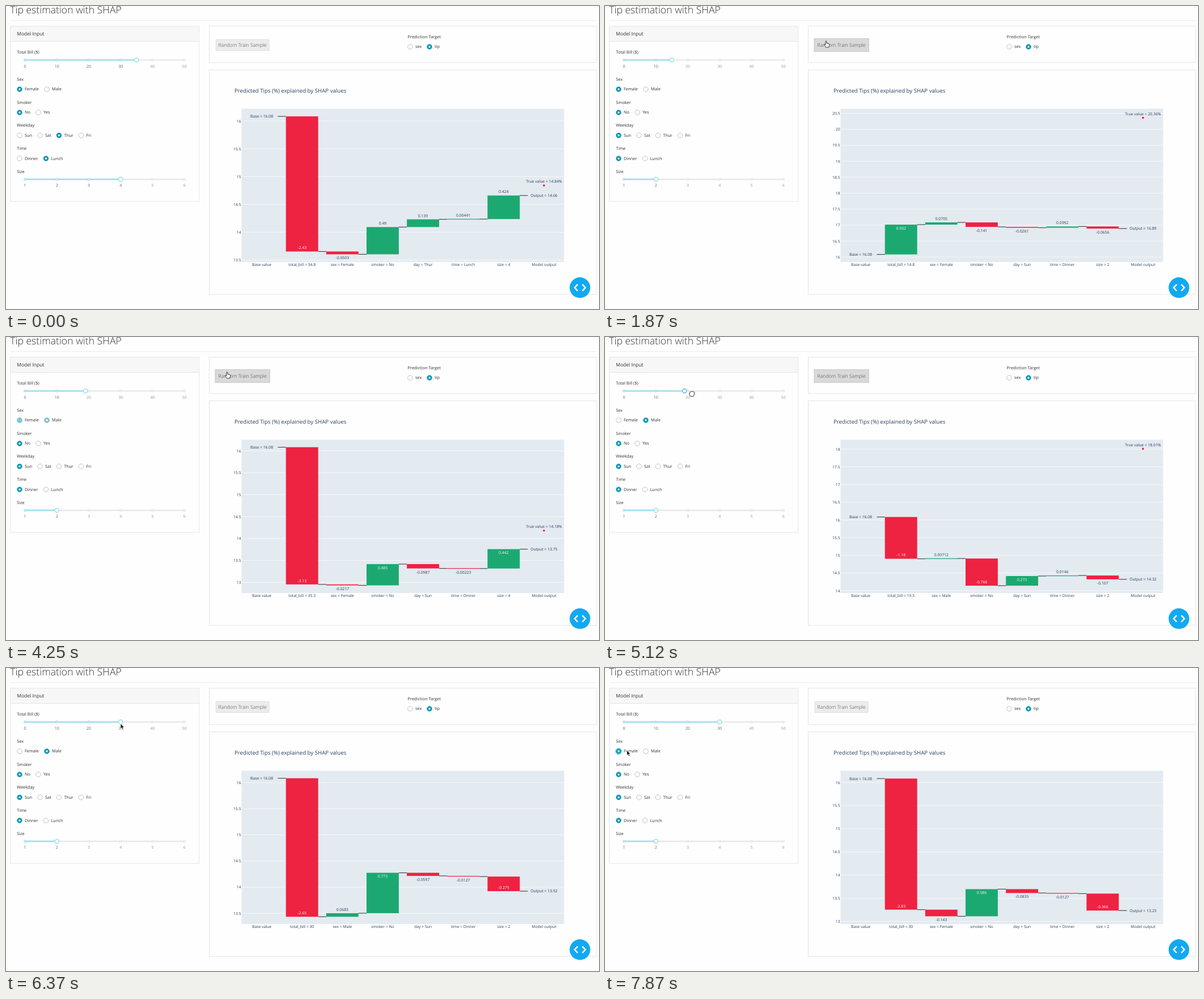
Write an HTML page that moves like this. It is 1046 px wide and 535 px high and loops after 8 s.

```html
<!DOCTYPE html>
<html lang="en">
<head>
<meta charset="utf-8">
<title>Tip estimation</title>
<style>
  html, body { margin: 0; width: 100%; height: 100%; overflow: hidden; background: #fefefe; }
  svg { display: block; }
  text { font-family: "Open Sans", "Noto Sans", sans-serif; text-rendering: geometricPrecision; white-space: pre; }
</style>
</head>
<body>
<svg id="stage" width="1046" height="535" viewBox="0 0 1046 535"></svg>
<script>
const LOOP = 8000, STEP = 125;
const RED = '#ee2241', GREEN = '#1ca971', INK = '#2a3f5f', TEAL = [11, 150, 180];
const stage = document.getElementById('stage');

// Input states: bill, sex, smoker, weekday, time, size
const inputs = [
  { at: -1000, bill: 35, picks: [0, 0, 2, 1], size: 4 },
  { at: 1500, bill: 15, picks: [0, 0, 0, 0], size: 2 },
  { at: 2625, bill: 35, picks: [0, 0, 0, 0], size: 4 },
  { at: 4125, bill: 19, picks: [1, 0, 0, 0], size: 2 },
  { at: 7500, bill: 30, picks: [0, 0, 0, 0], size: 2 }
];
const groups = [
  { name: 'Sex', y: 147, items: [['Female', 24], ['Male', 72]] },
  { name: 'Smoker', y: 188, items: [['No', 24], ['Yes', 57]] },
  { name: 'Weekday', y: 228.4, items: [['Sun', 24], ['Sat', 60], ['Thur', 93.5], ['Fri', 132.5]] },
  { name: 'Time', y: 269.2, items: [['Dinner', 24], ['Lunch', 70.5]] }
];

// y16 is the height of the value 16, unit the pixels per percent
const charts = [
  { at: 0, y16: 203, unit: 98.2, bill: 34.8, picks: [0, 0, 2, 1], size: 4, truth: '14.84', out: '14.66',
    steps: ['-2.43', '-0.0503', '0.49', '0.139', '0.00441', '0.424'], risesOutside: true },
  { at: 1750, y16: 443.3, unit: 56.4, bill: 14.8, picks: [0, 0, 0, 0], size: 2, truth: '20.36', out: '16.89',
    steps: ['0.932', '0.0705', '-0.141', '-0.0261', '0.0392', '-0.0656'] },
  { at: 2875, y16: 201, unit: 77.4, bill: 35.3, picks: [0, 0, 0, 0], size: 4, truth: '14.18', out: '13.75',
    steps: ['-3.13', '-0.0217', '0.485', '-0.0987', '-0.00223', '0.442'] },
  { at: 4625, y16: 323, unit: 62.5, bill: 19.5, picks: [1, 0, 0, 0], size: 2, truth: '18.01', out: '14.32',
    steps: ['-1.18', '0.00712', '-0.768', '0.273', '0.0146', '-0.107'] },
  { at: 6375, y16: 202.3, unit: 92.3, bill: 30, picks: [1, 0, 0, 0], size: 2, out: '13.92',
    steps: ['-2.65', '0.0683', '0.773', '-0.0597', '-0.0127', '-0.279'] },
  { at: 7750, y16: 202, unit: 81.8, bill: 30, picks: [0, 0, 0, 0], size: 2, out: '13.23',
    steps: ['-2.83', '-0.143', '0.586', '-0.0835', '-0.0127', '-0.366'] }
];

const pointer = [
  { at: 0 },
  { at: 500, kind: 'arrow', x: 315, y: 18 },
  { at: 625, kind: 'arrow', x: 349, y: 22 },
  { at: 1250, kind: 'arrow', x: 370, y: 46 },
  { at: 1375, kind: 'hand', x: 389, y: 61.5 },
  { at: 4875, kind: 'arrow', x: 330, y: 78 },
  { at: 5000, kind: 'arrow', x: 200, y: 96 },
  { at: 5125, kind: 'grab', x: 153, y: 100 },
  { at: 5250, kind: 'grab' },
  { at: 6375, kind: 'arrow', x: 202, y: 98 },
  { at: 7000, kind: 'arrow', x: 191, y: 102 },
  { at: 7250, kind: 'arrow', x: 150, y: 112 },
  { at: 7375, kind: 'arrow', x: 86, y: 132 },
  { at: 7500, kind: 'arrow', x: 38.5, y: 145 }
];
const drag = [21, 23, 25, 26, 27, 28, 29, 30];

const latest = (list, t) => list.filter(s => s.at <= t).pop();
const rect = (x, y, w, h, fill, extra = '') =>
  `<rect x="${x}" y="${y}" width="${w}" height="${h}" fill="${fill}" ${extra}/>`;
const disc = (x, y, r, fill, stroke = 'none', width = 1) =>
  `<circle cx="${x}" cy="${y}" r="${r}" fill="${fill}" stroke="${stroke}" stroke-width="${width}"/>`;
const line = (x1, y1, x2, y2, stroke, width) =>
  `<path d="M${x1} ${y1}L${x2} ${y2}" stroke="${stroke}" stroke-width="${width}"/>`;
const text = (x, y, s, size, fill = '#333', anchor = 'start', weight = 400) =>
  `<text x="${x}" y="${y}" font-size="${size}" fill="${fill}" text-anchor="${anchor}" font-weight="${weight}">${s}</text>`;
const box = (x, y, w, h) => rect(x, y, w, h, '#fefefe', 'stroke="#dedede" stroke-width=".8"');
const label = (x, y, s) => text(x, y + 2.7, s, 7.41);

function frame() {
  return text(7.2, 12.6, 'Tip estimation with SHAP', 17.6, '#333', 'start', 300)
    + line(7.5, 25.7, 1042, 25.7, '#e6e6e6', .8)
    + box(7.7, 35.7, 333, 309.3) + rect(8.1, 36.1, 332.2, 26, '#f7f7f7') + line(7.7, 62.4, 340.7, 62.4, '#dedede', .8)
    + box(358.5, 35.7, 683.3, 64.2) + box(358.5, 112.8, 683.3, 396.4)
    + text(19.2, 52.2, 'Model Input', 8.55)
    + label(708.6, 54.3, 'Prediction Target')
    + radio('sex', 713, 72, false, 0) + radio('tip', 747, 72, true, 1);
}

function button(active) {
  return (active
    ? rect(369.2, 57.7, 96, 22.6, '#d9d9d9', 'stroke="#d0d0d0" stroke-width="1.6"')
    : rect(370.2, 59.2, 93.8, 19.2, '#ececec', 'stroke="#d8d8d8" stroke-width=".8"'))
    + text(417.2, 72.3, 'Random Train Sample', 8.7, '#444', 'middle', 300);
}

function radio(name, x, y, on, amount) {
  const mix = TEAL.map(c => Math.round(254 + (c - 254) * amount));
  const edge = TEAL.map(c => Math.round(178 + (c - 178) * amount));
  return disc(x, y, 4.3, `rgb(${mix})`, `rgb(${edge})`, .8)
    + (on ? disc(x, y, 1.7, '#fff') : '')
    + label(x + 9, y - .4, name);
}

function slider(y, marks, value, focus) {
  const left = 33.5, gap = 56.24;
  const px = v => left + (v - marks[0]) / (marks[1] - marks[0]) * gap;
  const blue = '#9adff0', grey = '#e7e7e7';
  let s = line(left, y, left + 5 * gap, y, grey, 2.3) + line(left, y, px(value), y, blue, 2.3);
  for (const m of marks) {
    const on = m <= value;
    s += disc(px(m), y, 1.7, '#fff', on ? '#86d6ea' : '#dedede', 1.1)
      + text(px(m), y + 13.4, m, 7.1, on ? '#666' : '#999', 'middle');
  }
  return s + disc(px(value), y, 3.6, '#fff', focus ? '#35b3d2' : '#86d6ea', 1.2);
}

function controls(t) {
  const now = latest(inputs, t), before = inputs[inputs.indexOf(now) - 1] || now;
  const progress = Math.min(1, (t - now.at) / 250);
  let bill = now.bill;
  if (t >= 5250 && t < 7500) bill = drag[Math.min(drag.length - 1, (t - 5250) / STEP)];
  let s = label(19.2, 80.8, 'Total Bill ($)')
    + slider(95.3, [0, 10, 20, 30, 40, 50], bill, t >= 5125 && t < 6375)
    + label(19.2, 292, 'Size') + slider(306, [1, 2, 3, 4, 5, 6], now.size, false);
  if (t >= 7500) s += disc(24, 147, 5.6, 'none', '#9fe0ea', 1.6);
  groups.forEach((g, i) => {
    s += label(19.2, g.y - 17.8, g.name);
    g.items.forEach(([name, x], j) => {
      const on = now.picks[i] === j, was = before.picks[i] === j;
      const amount = on === was ? +on : on ? progress : 1 - progress;
      s += radio(name, x, g.y, on, amount);
    });
  });
  return s;
}

function chart(c) {
  const left = 415.5, top = 181.4, right = 984.5, bottom = 452, col = (right - left) / 8;
  const py = v => c.y16 - (v - 16) * c.unit;
  const mid = i => left + col * (i + .5), half = col * .4;
  const note = (x, y, s, fill = INK) => text(x, y + 2.4, s, 6.84, fill, 'middle');
  const link = (i, y) => line(mid(i) + half, y, mid(i + 1) - half, y, '#444', 1.15);
  let s = text(403, 152.9, 'Predicted Tips (%) explained by SHAP values', 9.69, INK)
    + rect(left, top, right - left, bottom - top, '#e3eaf0');
  for (let v = 12; v <= 21; v += .5) {
    const y = py(v);
    if (y < top || y > bottom) continue;
    s += line(left, y, right, y, '#fff', .7) + text(414.6, y + 2.5, v, 6.84, INK, 'end');
  }
  const chosen = groups.map((g, i) => g.items[c.picks[i]][0]);
  ['Base value', 'total_bill = ' + c.bill, 'sex = ' + chosen[0], 'smoker = ' + chosen[1], 'day = ' + chosen[2],
    'time = ' + chosen[3], 'size = ' + c.size, 'Model output'].forEach((n, i) => s += note(mid(i), 457, n));

  let value = 16.083;
  s += note(mid(0), py(value), 'Base = 16.08') + link(0, py(value));
  c.steps.forEach((step, k) => {
    const i = k + 1, up = +step > 0, from = py(value);
    value += +step;
    const to = py(value), tall = Math.abs(to - from), height = Math.max(1.2, tall);
    const inside = tall > 15 && !(up && c.risesOutside);
    const shift = (up === inside ? 1 : -1) * 6.5;
    s += rect(mid(i) - half, Math.min(from, to) - (height - tall) / 2, 2 * half, height, up ? GREEN : RED)
      + note(mid(i), to + shift, step, inside ? '#f4f6f8' : INK) + link(i, to);
  });
  s += note(mid(7), py(value), 'Output = ' + c.out);
  if (c.truth) {
    const y = py(+c.truth);
    s += disc(mid(7), y, 1.8, RED) + note(mid(7), y - 7, `True value = ${c.truth}%`);
  }
  return s;
}

const codeButton = disc(1012.4, 497.3, 18.2, '#12a9f2')
  + '<path d="M1008.4 491.6l-5.4 5.7 5.4 5.7M1016.6 491.6l5.4 5.7-5.4 5.7" fill="none" stroke="#fff" stroke-width="2.5"/>';

const shapes = {
  arrow: ['M0 0V9.6L2.2 7.6 3.8 11.2 5.5 10.4 3.9 7H6.6Z', '#111', '#fff'],
  hand: ['M0 1.2Q.2 0 1 .2Q1.9.4 1.9 1.4V4.2L6 5Q7 5.4 6.8 6.6L6.2 9.4 5.6 11.4H.6L-2 7.6Q-2.2 6.4-.9 6.6L0 7.4Z', '#fff', '#222'],
  grab: ['M-3.4-2Q-3-4-1.6-3.2Q-.6-5 .8-3.6Q2.2-4.8 3-3Q4.8-3.4 4.7-1.6L4.2 2.2 3.2 4.8H-2L-4.4 1Q-4.8-.6-3.2-.4Z', '#fff', '#222']
};

function cursor(t) {
  const p = latest(pointer, t);
  if (!p.kind) return '';
  const [d, fill, stroke] = shapes[p.kind];
  const x = p.x ?? 33.5 + 5.624 * drag[Math.min(drag.length - 1, (t - 5250) / STEP)];
  return `<path transform="translate(${x} ${p.y ?? 100})" d="${d}" fill="${fill}" stroke="${stroke}" stroke-width=".9" stroke-linejoin="round"/>`;
}

let shown = -1;
function tick() {
  // Picture advances on a fixed beat
  const t = Math.floor((performance.now() % LOOP + 5) / STEP) * STEP % LOOP;
  if (t !== shown) {
    shown = t;
    stage.innerHTML = frame() + button(t >= 1375 && t < 5250) + controls(t)
      + chart(latest(charts, t)) + codeButton + cursor(t);
  }
  requestAnimationFrame(tick);
}
tick();
</script>
</body>
</html>
```
